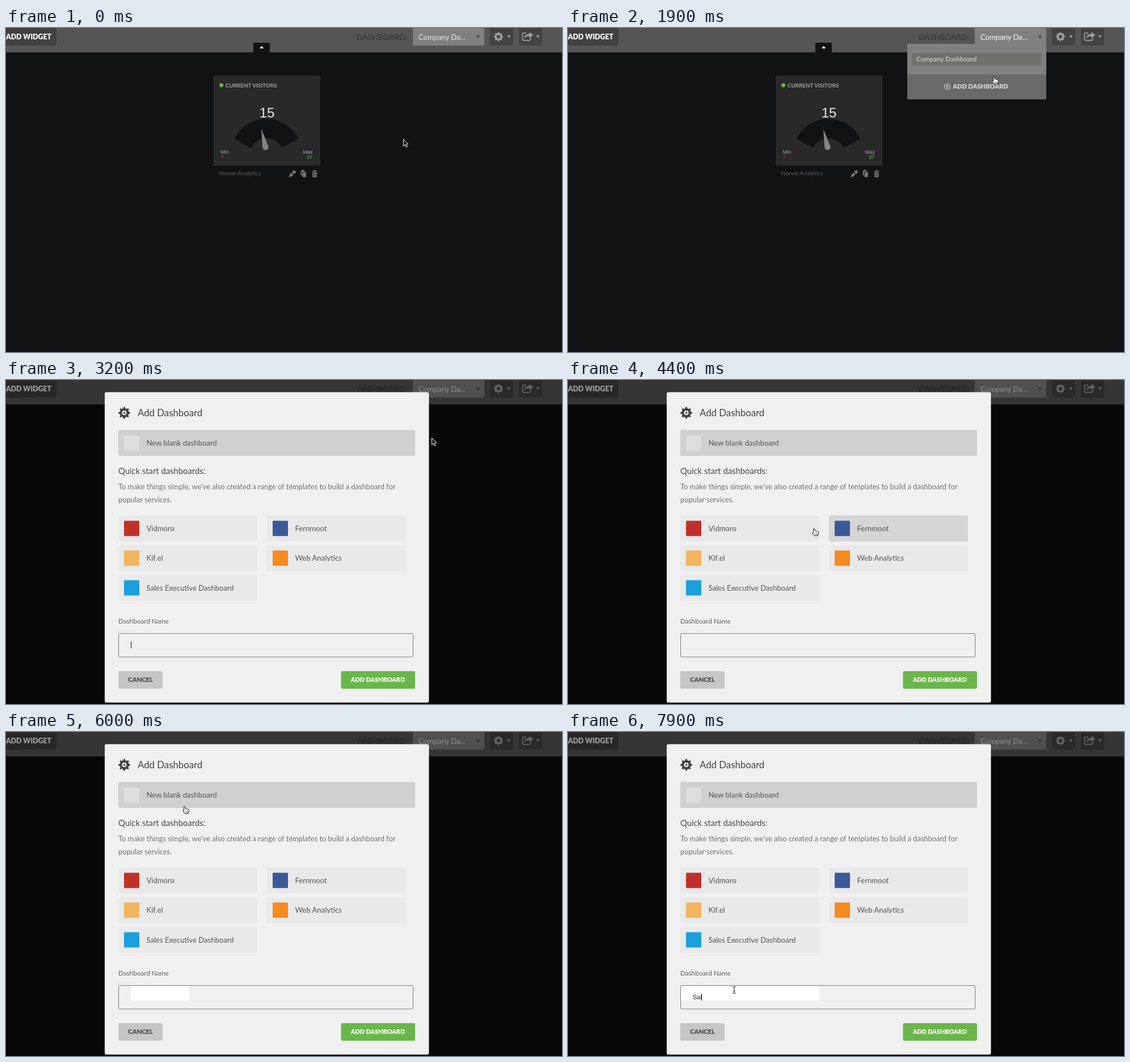
An HTML page for the animation above (8000 ms loop, 980 px wide and 572 px high).

```html
<!DOCTYPE html>
<html lang="en">
<head>
<meta charset="utf-8">
<title>Add dashboard</title>
<style>
  html, body { margin: 0; width: 100%; height: 100%; overflow: hidden; background: #111214; }
  svg { display: block; width: 980px; height: 572px; }
  text { font-family: Lato, "Open Sans", sans-serif; white-space: pre; }
  .arial { font-family: "Liberation Sans", Arial, sans-serif; }
</style>
</head>
<body>
<svg id="stage" viewBox="0 0 980 572" xmlns="http://www.w3.org/2000/svg"></svg>
<script>
const LOOP = 8000, STEP = 100;

// Markup helpers
const rect = (x, y, w, h, fill, r = 0, more = '') =>
  `<rect x="${x}" y="${y}" width="${w}" height="${h}" rx="${r}" fill="${fill}" ${more}/>`;
const path = (d, fill, more = '') => `<path d="${d}" fill="${fill}" ${more}/>`;
const text = (x, y, size, fill, str, weight = 400, more = '') =>
  `<text x="${x}" y="${y}" font-size="${size}" font-weight="${weight}" fill="${fill}" ${more}>${str}</text>`;
const group = (id, body) => `<g id="${id}">${body}</g>`;
const down = (x, y, fill, w = 3) => path(`M${x - w} ${y}h${2 * w}l${-w} ${w * 1.6}z`, fill);

function gear(cx, cy, r, hole, fill) {
  let d = '';
  for (let i = 0; i < 32; i++) {
    const a = (i - 0.5) / 32 * 2 * Math.PI;
    const k = i % 4 < 2 ? r : r * 0.76;
    d += `${i ? 'L' : 'M'}${(cx + k * Math.sin(a)).toFixed(2)} ${(cy - k * Math.cos(a)).toFixed(2)}`;
  }
  d += `ZM${cx - hole} ${cy}a${hole} ${hole} 0 1 0 ${2 * hole} 0a${hole} ${hole} 0 1 0 ${-2 * hole} 0Z`;
  return path(d, fill, 'fill-rule="evenodd"');
}

const header = () =>
  rect(0, 0, 980, 43, '#555') +
  rect(-5, -5, 94, 36, '#414141', 3) +
  text(0, 20, 12.3, '#fff', 'ADD WIDGET', 900) +
  rect(436, 26, 29, 18, '#111214') +
  path('M447 36l3.7-4.2 3.7 4.2z', '#fff') +
  text(618, 20.5, 13.6, '#3b3b3b', 'DASHBOARD:', 700) +
  rect(717, -5, 126, 36, '#808080', 3) +
  text(727, 20.5, 13.1, '#e4e4e4', 'Company Da...') +
  down(832, 13.5, '#444') +
  rect(853, -5, 41, 36, '#434343', 3) +
  gear(868, 15.3, 8.2, 3.1, '#a0a0a0') +
  down(886.5, 13, '#a0a0a0') +
  rect(904, -5, 41, 36, '#434343', 3) +
  path('M917 8.8h-4.5q-2 0-2 2v9q0 2 2 2h10q2 0 2-2v-2.3', 'none', 'stroke="#a0a0a0" stroke-width="1.7"') +
  path('M913.5 18.5q0-7.5 9-8v-3.5l6.8 5.5-6.8 5.5v-3.5q-6-.3-9 4z', '#a0a0a0') +
  down(937.5, 13, '#a0a0a0');

const widget = () =>
  rect(366, 84, 188, 159, '#292929') +
  '<circle cx="379.5" cy="101" r="3.5" fill="#66b848"/>' +
  text(387, 104.5, 9.8, '#a3a3a3', 'CURRENT VISITORS', 700) +
  text(460, 158, 24, '#e6e6e6', '15', 400, 'class="arial" text-anchor="middle"') +
  path('M402.5 195.5A63 63 0 0 1 515.5 195.5L486 212A29.5 29.5 0 0 0 432 212Z', '#111214') +
  path('M450 178L461.8 207.5A5.2 5.2 0 1 1 452.2 210Z', '#858585') +
  text(378.5, 222, 9, '#a8a8a8', 'Min', 400, 'class="arial"') +
  text(378.5, 231, 9, '#b5402e', '7', 400, 'class="arial"') +
  text(540.5, 222, 9, '#a8a8a8', 'Max', 400, 'class="arial" text-anchor="end"') +
  text(540.5, 231, 9, '#7cc466', '27', 400, 'class="arial" text-anchor="end"') +
  text(375.5, 260, 10.3, '#606060', 'Norvel Analytics') +
  // pen, copy and bin
  path('M498.5 263.5l1.5-5 3-3 3.5 3.5-3 3zM504 254.5l3-3q1.5-.8 3 .7t.7 3l-3 3z', '#777') +
  path('M519.5 253l2.5-2.5h4v3h-2.5l-2 2v5h-2zM522.5 256.5l2.3-2.2h4v9h-6.3z', '#777') +
  path('M539.5 252.5h3v-1.3h3v1.3h3v1.5h-9zM540.3 255h7.4v8.5h-7.4z', '#777') +
  path('M542.5 256.5v5.5M544 256.5v5.5M545.5 256.5v5.5', 'none', 'stroke="#222" stroke-width=".6"');

const menu = () =>
  rect(598, 28, 245, 98, '#6a6a6a', 2) +
  rect(598, 28, 245, 54, '#808080', 2) +
  rect(717, 20, 126, 20, '#808080') +
  down(832, 13.5, '#444') +
  text(727, 20.5, 13.1, '#e4e4e4', 'Company Da...') +
  rect(606, 44, 228, 22, '#70706e') +
  text(614, 58.5, 11.6, '#e0e0e0', 'Company Dashboard') +
  '<circle cx="668.5" cy="103.5" r="4.9" fill="none" stroke="#d8d8d8" stroke-width="1.1"/>' +
  path('M666 103.5h5M668.5 101v5', 'none', 'stroke="#d8d8d8" stroke-width="1.1"') +
  text(678.5, 107.3, 11, '#d8d8d8', 'ADD DASHBOARD', 900);

// Template rows: x, y, label, icon colour
const ROWS = [
  [198, 239, 'Vidmoro', '#c0302a'],
  [460, 239, 'Fernmoot', '#3b5998'],
  [198, 291.5, 'Kif.el', '#f2b45c'],
  [460, 291.5, 'Web Analytics', '#f68b1f'],
  [198, 344, 'Sales Executive Dashboard', '#1b9fdd'],
];
const ROW_W = 245, ROW_H = 46;

const row = ([x, y, label, color]) =>
  rect(x, y, ROW_W, ROW_H, '#e9e9e9', 2, 'class="row"') +
  rect(x + 10, y + 9.5, 27, 27, color, 1) +
  text(x + 49.5, y + 27.5, 13.1, '#555', label);

const dialog = () =>
  rect(0, 0, 980, 572, '#000', 0, 'opacity=".38"') +
  rect(0, 43, 980, 529, '#000', 0, 'opacity=".35"') +
  rect(174, 21.5, 571.5, 548, '#f0f0f0', 3) +
  gear(208.5, 58, 10.5, 4, '#444') +
  '<circle cx="208.5" cy="58" r="1.8" fill="#444"/>' +
  text(232, 64, 16.8, '#444', 'Add Dashboard') +
  rect(198, 88, 523, 46, '#d0d0d0', 2) +
  rect(208, 98, 27, 27, '#dedede') +
  text(247.5, 115.5, 13.1, '#555', 'New blank dashboard') +
  text(198, 166, 14.8, '#4a4a4a', 'Quick start dashboards:') +
  text(198, 193, 12.87, '#727272', "To make things simple, we've also created a range of templates to build a dashboard for") +
  text(198, 216, 12.87, '#727272', 'popular services.') +
  ROWS.map(row).join('') +
  text(198, 430, 11.7, '#606060', 'Dashboard Name') +
  rect(0, 448, 0, 26, '#fff', 0, 'id="patch"') +
  rect(198.5, 447.5, 519, 41.5, 'none', 2, 'stroke="#777"') +
  text(220, 471.5, 11, '#222', '', 400, 'id="typed" class="arial"') +
  rect(220, 462, 1, 12, '#111', 0, 'id="caret"') +
  rect(198, 514, 78, 31, '#c6c6c6', 2) +
  text(237, 533, 11.3, '#4c4c4c', 'CANCEL', 900, 'text-anchor="middle"') +
  rect(590.5, 514, 130.5, 31, '#6ab64b', 2) +
  text(655.5, 533, 10.8, '#fff', 'ADD DASHBOARD', 900, 'text-anchor="middle"');

// Pointers, each with its hot spot at 0,0
const pointers = () =>
  group('arrow', path('M.5.5V12.3L3.2 9.8 5.1 14.2 7.2 13.3 5.3 9H8.8Z', '#161616',
    'stroke="#f2f2f2" stroke-width="1"')) +
  group('hand', path('M-1.3 8V1.6Q-.9.2.4 1.5L1.8 5.5Q3 4.6 3.6 5.8 4.8 5 5.5 6.3 7.2 5.8 7.4 7.5V10.5L6 14H.2L-3.3 9.3Q-3.5 7.3-1.3 8.8Z', '#fff',
    'stroke="#111" stroke-width="1" stroke-linejoin="round"') +
    path('M1.8 9.5v3M3.6 9.5v3M5.3 9.5v3', 'none', 'stroke="#222" stroke-width=".7"')) +
  group('beam', path('M-3-5.5Q-.3-5.5 0-4 .3-5.5 3-5.5M0-4V5M-3 6.5Q-.3 6.5 0 5 .3 6.5 3 6.5M-1.5 2.5h3', 'none',
    'stroke="#222" stroke-width="1"'));

document.getElementById('stage').innerHTML =
  rect(0, 0, 980, 572, '#111214') + header() + widget() +
  group('menu', menu()) + group('dialog', dialog()) + group('pointer', pointers());

const $ = id => document.getElementById(id);
const rowEls = [...document.querySelectorAll('.row')];
const show = (id, on) => $(id).setAttribute('display', on ? 'inline' : 'none');

// Pointer path: time, x, y
const PATH = [
  [0, 700, 196], [300, 700, 196], [600, 738, 104], [900, 772, 17],
  [1400, 772, 17], [1900, 751, 85], [2100, 750, 102], [3400, 750, 102],
  [3700, 690, 150], [4000, 600, 225], [4200, 540, 258], [4400, 434, 261],
  [4700, 332, 257], [4900, 332, 257], [5200, 325, 180], [5500, 319, 118],
  [5700, 319, 118], [6000, 315, 130], [6600, 337, 362], [7000, 293, 455], [LOOP, 293, 455],
];
// Times at which the caret turns on and off in turn
const BLINKS = [3200, 4000, 4500, 5000, 5500, 6000, 6500, 7300, 7600];
const TYPED = [[7600, 'S'], [7800, 'Sa'], [7900, 'Sal']];

function spot(t) {
  const i = Math.max(1, PATH.findIndex(k => k[0] >= t));
  const [t0, x0, y0] = PATH[i - 1], [t1, x1, y1] = PATH[i];
  const p = (t - t0) / (t1 - t0);
  return [Math.round(x0 + (x1 - x0) * p), Math.round(y0 + (y1 - y0) * p)];
}

const inside = ([px, py], x, y, w, h) => px >= x && px < x + w && py >= y && py < y + h;
const rowAt = p => ROWS.findIndex(([x, y]) => inside(p, x, y, ROW_W, ROW_H));

function pointerKind(t, p) {
  if (t < 2500) return t >= 900 ? 'hand' : 'arrow';
  if (t < 3200) return 'arrow';
  if (inside(p, 198, 447, 520, 43)) return 'beam';
  return rowAt(p) >= 0 || inside(p, 198, 88, 523, 46) ? 'hand' : 'arrow';
}

function draw(t) {
  const p = spot(t), kind = pointerKind(t, p);
  $('pointer').setAttribute('transform', `translate(${p})`);
  for (const id of ['arrow', 'hand', 'beam']) show(id, id === kind);
  show('menu', t >= 1200 && t < 2500);
  show('dialog', t >= 3200);

  // Row highlight trails the pointer by one step
  const hot = t >= 3500 && t < 5800 ? rowAt(spot(t - STEP)) : -1;
  rowEls.forEach((el, i) => el.setAttribute('fill', i === hot ? '#d5d5d5' : '#e9e9e9'));

  const [left, right] = t < 6000 ? [0, 0] : t < 6500 ? [220, 323] : [199, 443];
  $('patch').setAttribute('x', left);
  $('patch').setAttribute('width', right - left);

  const entry = TYPED.filter(k => k[0] <= t).pop();
  $('typed').textContent = entry ? entry[1] : '';
  const end = entry ? $('typed').getComputedTextLength() : 0;
  $('caret').setAttribute('x', Math.floor(220 + end));
  show('caret', BLINKS.filter(b => b <= t).length % 2 === 1);
}

const start = performance.now();
function tick() {
  const t = Math.max(0, performance.now() - start) % LOOP;
  draw(Math.floor(t / STEP) * STEP);
  requestAnimationFrame(tick);
}
tick();
</script>
</body>
</html>
```
